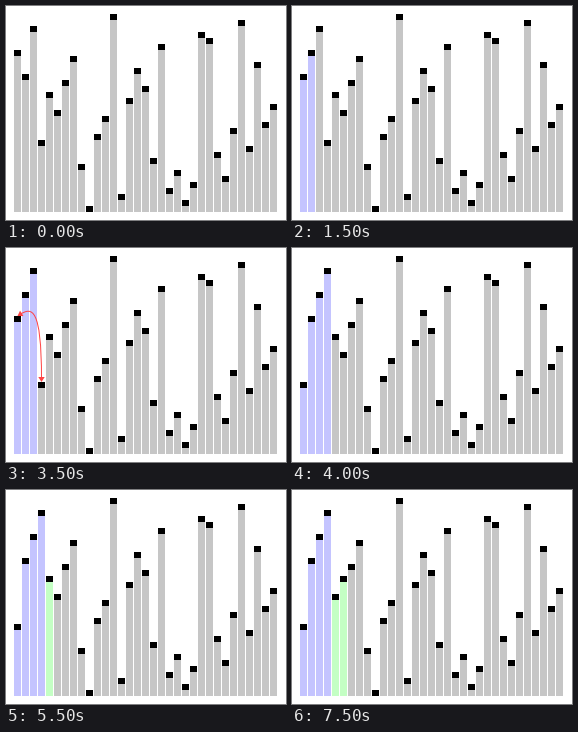
Recreate the animation shown at these times as a matplotlib script. Size 280 by 214 pixels, loop 8000 ms.

```python
import numpy as np
import matplotlib.pyplot as plt
from matplotlib.animation import FuncAnimation
from matplotlib.path import Path
from matplotlib.patches import PathPatch, Polygon, Rectangle

W, H, DPI = 280, 214, 64
BASE, PITCH, BAR_W, CAP_H = 206, 8, 7, 6
GRAY, PILE_COLORS, RED = "#c6c6c6", ["#c4c4ff", "#c4ffc4"], "#ff4444"
LIFT, REACH = 9, 0.6  # arrow controls: px above the higher cap, part of the span

# the shuffled input: 0 is the tallest bar, one cap height per rank
RANKS = [6, 10, 2, 21, 13, 16, 11, 7, 25, 32, 20, 17, 0, 30, 14, 9, 12,
         24, 5, 29, 26, 31, 28, 3, 4, 23, 27, 19, 1, 22, 8, 18, 15]


def unshuffle(ranks, count):
    """Deal bars onto piles, recording (bars, pile sizes, compared pair)."""
    bars, piles = list(ranks), []
    steps = [(bars[:], [], None)]

    def record(pair=None):
        steps.append((bars[:], piles[:], pair))

    for n in range(count):
        start = 0
        for p, size in enumerate(piles):
            last = start + size - 1
            record((start, n))
            if bars[n] > bars[start]:
                bars.insert(start, bars.pop(n))
                piles[p] += 1
                break
            if size > 1:
                record((last, n))
                if bars[n] < bars[last]:
                    bars.insert(last + 1, bars.pop(n))
                    piles[p] += 1
                    break
            start += size
        else:
            piles.append(1)
        record()
    return steps


def cap_top(rank):
    return PITCH + CAP_H * rank


def cap_point(i, rank):
    return np.array([PITCH * (i + 1) + BAR_W / 2, cap_top(rank)])


def toward(p, q):
    return (q - p) / np.hypot(*(q - p))


def head(tip, control, length=5, half=3.2):
    back = toward(tip, control)
    side = half * np.array([-back[1], back[0]])
    base = tip + length * back
    return [tip, base + side, base - side]


def arrow_shape(bars, pair):
    """Leave the higher cap sideways and drop straight onto the lower one."""
    high, low = sorted(pair, key=lambda i: bars[i])
    a, b = cap_point(high, bars[high]), cap_point(low, bars[low])
    ca = a + [REACH * (b[0] - a[0]), -LIFT]
    cb = np.array([b[0], a[1] - LIFT])
    ends = a + 3 * toward(a, ca), b + 3 * toward(b, cb)
    curve = Path([ends[0], ca, cb, ends[1]], [Path.MOVETO] + [Path.CURVE4] * 3)
    return curve, head(a, ca), head(b, cb)


steps = unshuffle(RANKS, 6)

fig = plt.figure(figsize=(W / DPI, H / DPI), dpi=DPI, facecolor="white")
ax = fig.add_axes([0, 0, 1, 1])
ax.set_xlim(0, W)
ax.set_ylim(H, 0)
ax.axis("off")


def column(i, color, height):
    return ax.add_patch(Rectangle((PITCH * (i + 1), 0), BAR_W, height,
                                  facecolor=color, linewidth=0))


stems = [column(i, GRAY, 0) for i in range(len(RANKS))]
caps = [column(i, "black", CAP_H) for i in range(len(RANKS))]
line = ax.add_patch(PathPatch(Path([(0, 0), (1, 1)]), fill=False,
                              edgecolor=RED, linewidth=72 / DPI, zorder=3))
heads = [ax.add_patch(Polygon([(0, 0), (1, 0), (0, 1)], facecolor=RED,
                              linewidth=0, zorder=4)) for _ in range(2)]


def update(n):
    bars, piles, pair = steps[n]
    colors = [c for c, size in zip(PILE_COLORS, piles) for _ in range(size)]
    colors += [GRAY] * (len(bars) - len(colors))
    for stem, cap, rank, color in zip(stems, caps, bars, colors):
        top = cap_top(rank)
        cap.set_y(top)
        stem.set_y(top + CAP_H)
        stem.set_height(BASE - top - CAP_H)
        stem.set_facecolor(color)
    for artist in (line, *heads):
        artist.set_visible(pair is not None)
    if pair:
        curve, *tips = arrow_shape(bars, pair)
        line.set_path(curve)
        for patch, tip in zip(heads, tips):
            patch.set_xy(tip)
    return [*stems, *caps, line, *heads]


anim = FuncAnimation(fig, update, frames=len(steps), interval=500,
                     repeat=True, repeat_delay=0)
plt.show()
```
